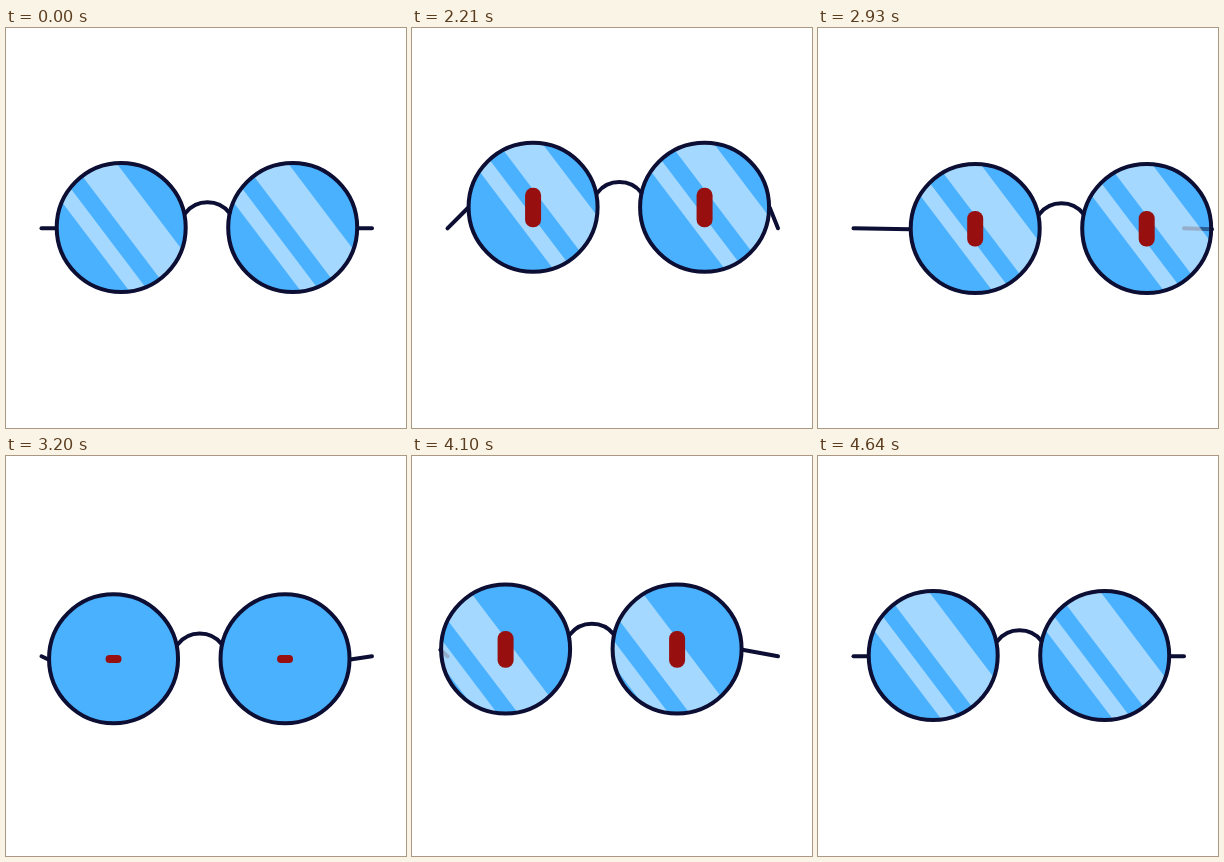
Recreate the animation shown at these times as an HTML page. Size 400 by 400 pixels, loop 4.67 s.

```html
<!DOCTYPE html>
<html lang="en">
<head>
<meta charset="utf-8">
<title>Round glasses</title>
<style>
  html, body { margin: 0; width: 100%; height: 100%; overflow: hidden; background: #fff; }
  svg { display: block; width: 100vw; height: 100vh; }
  .ink { fill: none; stroke: #0d0e33; stroke-width: 4; stroke-linecap: round; }
</style>
</head>
<body>
<svg viewBox="0 0 400 400">
  <defs>
    <clipPath id="lens"><circle r="64.5"/></clipPath>
    <clipPath id="both">
      <circle cx="115.2" cy="199.5" r="64.5"/>
      <circle cx="286.7" cy="199.5" r="64.5"/>
    </clipPath>
    <g id="arms" class="ink"><line id="armL"/><line id="armR"/></g>
    <g id="glare" fill="#fff" fill-opacity=".5">
      <path d="M-93 -70H-74L32 70H13Z"/>
      <path d="M-53 -70H-9L97 70H53Z"/>
    </g>
    <g id="shine" clip-path="url(#lens)"><use id="slide" href="#glare"/></g>
    <rect id="eye" x="-8" width="16" fill="#980f0f"/>
  </defs>
  <g id="body">
    <use href="#arms"/>
    <g fill="#4ab1ff">
      <circle cx="115.2" cy="199.5" r="64.5"/>
      <circle cx="286.7" cy="199.5" r="64.5"/>
    </g>
    <g clip-path="url(#both)"><use href="#arms" opacity=".5"/></g>
    <use href="#shine" x="115.2" y="199.5"/>
    <use href="#shine" x="286.7" y="199.5"/>
    <g class="ink">
      <path d="M179.5 185A28 28 0 0 1 223.5 185"/>
      <circle cx="115.2" cy="199.5" r="64.5"/>
      <circle cx="286.7" cy="199.5" r="64.5"/>
    </g>
    <g id="eyes">
      <use href="#eye" x="115.2" y="199.8"/>
      <use href="#eye" x="286.7" y="199.8"/>
    </g>
  </g>
</svg>
<script>
const LOOP = 4670, START = 2030, STEP = 30;
const $ = id => document.getElementById(id);
const set = (id, attrs) => {
  for (const k in attrs) $(id).setAttribute(k, attrs[k]);
};

const smooth = u => u * u * (3 - 2 * u);
const cubic = u => u < .5 ? 4 * u ** 3 : 1 - 4 * (1 - u) ** 3;

// Each key is [time, value, easing used to reach it].
const shiftX = [[2053, 0], [2533, 42, cubic], [2950, 42], [3430, -46.7, cubic],
  [3890, -46.7], [4290, 0]];
const shiftY = [[2000, 0], [2150, -23], [2430, 0], [2560, 1], [2950, 1],
  [3430, 5, cubic], [3940, 5], [4300, -22.5], [4440, 7], [4635, 0]];
const shineX = [[2015, 0], [2150, 14], [2400, 10], [2950, 10], [3200, -135],
  [3430, -90], [3890, -90], [4300, 14], [4440, -4], [4635, 0]];
const eyeH = [[1985, 0], [2150, 40], [2400, 35.5], [3040, 35.5], [3200, 8],
  [3400, 35], [3940, 35], [4300, 39], [4440, 33], [4615, 6]];

function at(keys, t) {
  if (t <= keys[0][0]) return keys[0][1];
  for (let i = 1; i < keys.length; i++) {
    const [t0, a] = keys[i - 1], [t1, b, ease = smooth] = keys[i];
    if (t < t1) return a + (b - a) * ease((t - t0) / (t1 - t0));
  }
  return keys[keys.length - 1][1];
}

function draw(ms) {
  let t = ms % LOOP;
  t = t < START ? 0 : START + Math.floor((t - START) / STEP) * STEP;
  const dx = at(shiftX, t), dy = at(shiftY, t), h = at(eyeH, t);

  set('body', { transform: `translate(${dx} ${dy})` });
  // The arm tips stay put while the hinges follow the frame.
  set('armL', { x1: 35.5 - dx, y1: 200.3 - dy, x2: 50, y2: 200.3 });
  set('armR', { x1: 366 - dx, y1: 200.3 - dy, x2: 352, y2: 200.3 });
  set('slide', { x: at(shineX, t) });
  set('eye', { y: -h / 2, height: h, rx: Math.min(7.5, h / 2), ry: Math.min(7.5, h / 2) });
  set('eyes', { visibility: t >= START && t < 4640 ? 'visible' : 'hidden' });
}

let origin;
function tick(now) {
  origin ??= now;
  draw(now - origin);
  requestAnimationFrame(tick);
}
draw(0);
requestAnimationFrame(tick);
</script>
</body>
</html>
```
